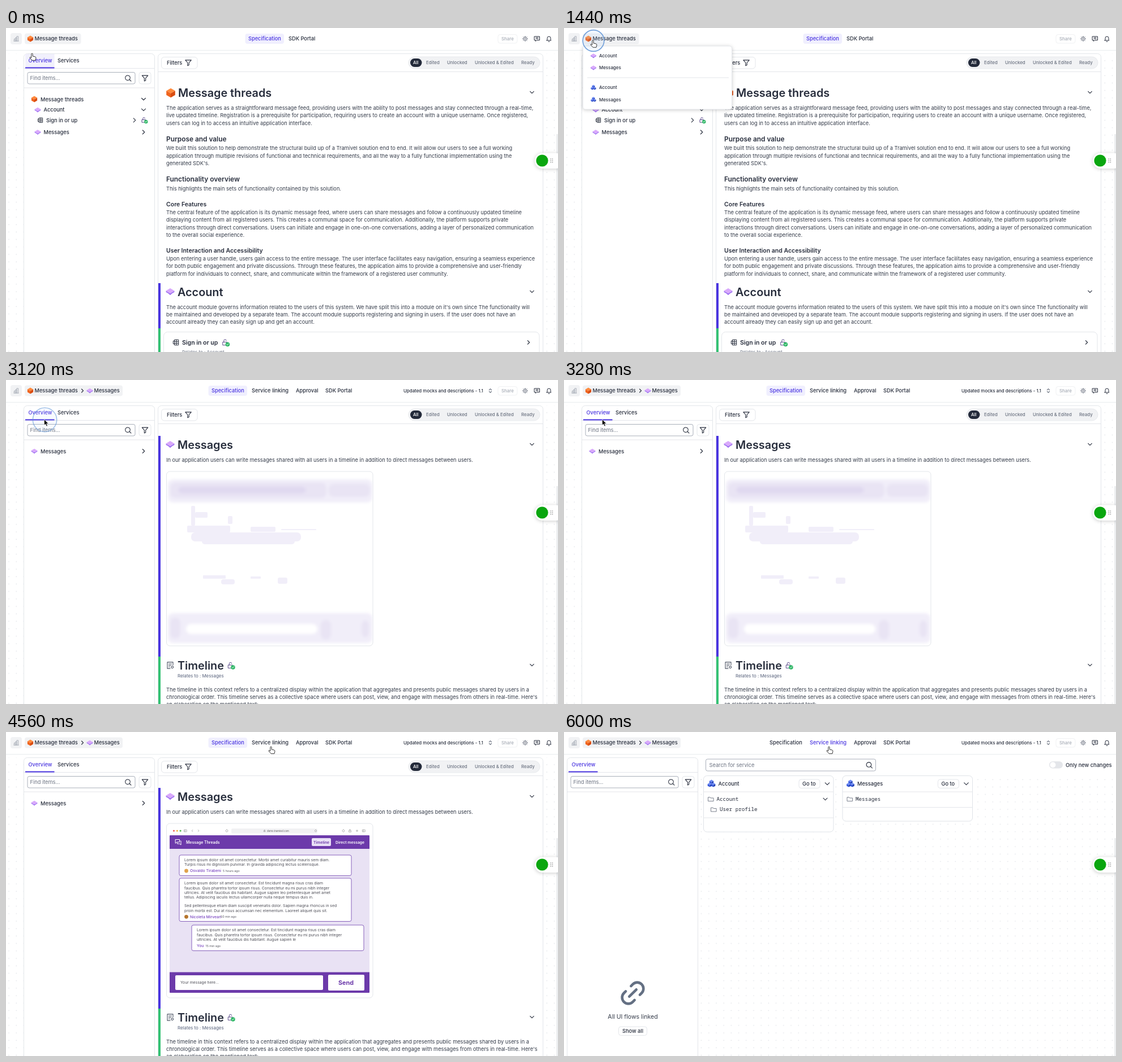
Animation, 975 px wide and 574 px high, one loop 6.48 s. Source, as an HTML page:

```html
<!DOCTYPE html>
<html lang="en">
<head>
<meta charset="utf-8">
<title>Message threads</title>
<style>
html, body { margin: 0; width: 100%; height: 100%; overflow: hidden; background: #fff; }
svg { display: block; font-family: Inter, sans-serif; font-optical-sizing: none; }
.mono { font-family: "Noto Sans Mono", monospace; }
.icon { fill: none; stroke-linecap: round; stroke-linejoin: round; vector-effect: non-scaling-stroke; }
.shadow { filter: drop-shadow(0 1px 3px #0003); }
</style>
</head>
<body>
<svg id="stage" width="975" height="574" viewBox="0 0 975 574"></svg>
<script>
const LOOP = 6480, OPEN_MENU = 1360, OPEN_MESSAGES = 2960, OPEN_LINKING = 5280;
const INK = '#272d3c', BODY = '#343b49', GREY = '#6b7280', LINE = '#e3e6ea';
const BLUE = '#4a35e0', GREEN = '#35c274', PURPLE = '#6c3aaa';

const ICONS = {
  search: 'M11 3a8 8 0 1 0 .01 0M17 17l5 5',
  funnel: 'M3 4h18l-7 8v7l-4 2v-9z',
  down: 'M6 9l6 6 6-6',
  right: 'M9 6l6 6-6 6',
  left: 'M15 6l-6 6 6 6',
  sort: 'M7 9l5-5 5 5M7 15l5 5 5-5',
  chart: 'M4 21v-8h5v8M9 21V8h5v13M14 21V3h6v18M3 21h18',
  gear: 'M12 9a3 3 0 1 0 .01 0M12 5a7 7 0 1 0 .01 0M12 2v3M12 19v3M2 12h3M19 12h3M5 5l2 2M17 17l2 2M5 19l2-2M17 7l2-2',
  chat: 'M3 4h18v13H11l-4 4v-4H3zM8 8h8M8 12h8',
  bell: 'M6 16v-6a6 6 0 0 1 12 0v6l2 2H4zM10 22h4',
  lock: 'M4 11h14v10H4zM7 11V7a4 4 0 0 1 8-1',
  flow: 'M8 3h13v18H8zM8 9h13M8 15h13M14 3v18M8 7H3v10h5',
  page: 'M20 11V3H4v18h8M8 8h8M8 12h6M8 16h3M18 14a3 3 0 1 0 .01 0',
  folder: 'M2 5h7l2 3h11v12H2z',
  talk: 'M3 3h14v9H8l-5 4zM20 8h2v14l-5-4H9v-3',
  plus: 'M12 5v14M5 12h14',
  panel: 'M3 5h18v14H3zM9 5v14',
  share: 'M6 10H4v11h16V10h-2M12 15V3M8 6l4-4 4 4',
  ring: 'M12 4a8 8 0 1 0 .01 0',
  chain: 'M9 17H7A5 5 0 0 1 7 7h2M15 7h2a5 5 0 0 1 0 10h-2M8 12h8'
};

// Text is placed by the middle of its capitals.
const text = (x, y, s, size = 9.24, weight = 400, color = BODY, extra = '') =>
  `<text x="${x}" y="${y + size * .364}" font-size="${size}" font-weight="${weight}" fill="${color}" ${extra}>${s}</text>`;
const label = (x, y, s, color = INK) => text(x, y, s, 9.24, 500, color);
const small = (x, y, s, color = INK) => text(x, y, s, 7.92, 500, color);
const heading = (x, y, s, size = 19.8) => text(x, y, s, size, 600, INK);
const lines = (x, y, rows, step = 13.2, size = 9.24, color = BODY) =>
  rows.map((s, i) => text(x, y + i * step, s, size, 400, color)).join('');
const rect = (x, y, x2, y2, fill = '#fff', stroke = 'none', r = 0, extra = '') =>
  `<rect x="${x}" y="${y}" width="${x2 - x}" height="${y2 - y}" rx="${r}" fill="${fill}" stroke="${stroke}" ${extra}/>`;
const rule = (x, x2, y, color = LINE) => rect(x, y, x2, y + 1, color);
const dot = (x, y, r, fill) => `<circle cx="${x}" cy="${y}" r="${r}" fill="${fill}"/>`;
const icon = (name, x, y, size = 14, color = INK, width = 1.1, turn = 0) =>
  `<path class="icon" d="${ICONS[name]}" stroke="${color}" stroke-width="${width}"
    transform="translate(${x} ${y}) rotate(${turn}) scale(${size / 24}) translate(-12 -12)"/>`;
const shape = (x, y, s, ...parts) =>
  `<g transform="translate(${x} ${y}) scale(${s})">${parts.map(([d, c]) => `<path d="${d}" fill="${c}"/>`).join('')}</g>`;
const cube = (x, y, s = 5.4, top = '#ff8a3d', left = '#f0641e', right = '#d94c10') => shape(x, y, s,
  ['M0-1L.95-.45L0 .1L-.95-.45z', top], ['M-.95-.45L0 .1V1L-.95 .45z', left], ['M.95-.45L0 .1V1L.95 .45z', right]);
const layers = (x, y, s = 5.4) => shape(x, y, s,
  ['M-1-.2V.15L-.5 .4L0 .85L.5 .4L1 .15V-.2L0 .4z', '#a273f2'], ['M0-.8L1-.2L0 .4L-1-.2z', '#d9a9fb']);
const service = (x, y, s = 3) => [[0, -.8], [-.8, .55], [.8, .55]]
  .map(([dx, dy]) => cube(x + dx * s, y + dy * s, s, '#6f8cf5', '#3457dc', '#2340b4')).join('');
const unlocked = (x, y, s = 11) => icon('lock', x, y, s, '#5b4a8a', 1) + dot(x + s * .3, y + s * .27, s * .29, '#2fb866') +
  `<path class="icon" d="M${x + s * .17} ${y + s * .27}l${s * .1} ${s * .1} ${s * .17}-${s * .2}" stroke="#fff" stroke-width=".9"/>`;

function header(page) {
  const tabs = page
    ? [[363, 'Specification'], [434, 'Service linking'], [512, 'Approval'], [564, 'SDK Portal']]
    : [[428, 'Specification'], [499, 'SDK Portal']];
  const active = page === 2 ? 1 : 0;
  return rule(0, 975, 39, '#e9ebee') + rect(8, 9, 28, 29, '#f1f2f4', 'none', 4) + icon('chart', 18, 19, 11, '#a3a9b3', .9) +
    rect(33, 9.5, page ? 206 : 132.5, 28.5, '#f1f2f4', 'none', 4) + cube(43, 19) + label(50.5, 19, 'Message threads') +
    (page ? icon('right', 135, 19, 12) + layers(148, 19) + label(155.5, 19, 'Messages') +
      small(702, 19, 'Updated mocks and descriptions - 1.1') + icon('sort', 855.5, 19, 10, GREY) : '') +
    (page < 2 ? rect(tabs[0][0] - 5.5, 10, tabs[0][0] + 63, 28, '#f0effe', 'none', 4) : '') +
    tabs.map(([x, s], i) => label(x, 19, s, i === active ? BLUE : INK)).join('') +
    rect(869, 11.5, 903, 27, '#fff', '#f0f1f3', 4) + small(875, 19, 'Share', '#a5abb5') +
    icon('gear', 917, 19, 11, GREY, .9) + icon('chat', 938, 19, 12, INK, 1) + icon('bell', 959, 19, 12, INK, 1);
}

function sidebar(x, tabs) {
  return rect(x + .5, 45.5, x + 231.5, 590, '#fff', LINE, 6) + rule(x, x + 231, 71) + rule(x, x + 231, 105.5) +
    (tabs > 1 ? rect(x + 3, 46, x + 54.5, 70, '#f1f0fc', 'none', 0, 'class="tabHover"') : '') +
    label(x + 8.5, 57.5, 'Overview', BLUE) + (tabs > 1 ? label(x + 60, 57.5, 'Services') : '') +
    rect(x + 3, 69.5, x + 54.5, 71.5, BLUE) +
    rect(x + 7, 78.5, x + 197, 99, '#fff', '#a9afba', 3) + text(x + 11.5, 89, 'Find items...', 9.24, 400, GREY) +
    icon('search', x + 184.5, 88.8, 13) + rect(x + 204, 78.5, x + 225, 99, '#fff', LINE, 4) + icon('funnel', x + 214.5, 88.8, 14);
}

function mainPanel() {
  return rect(268.5, 45.5, 948.5, 590, '#fff', LINE, 6) + rule(269, 948, 77) +
    rect(274.5, 51.5, 338, 72, '#fff', LINE, 5) + label(284, 61.5, 'Filters') + icon('funnel', 322, 61.5, 14) +
    rect(711, 51, 943, 72, '#f1f2f4', '#e8eaed', 10.5) + rect(714, 54, 734.5, 69, '#232a3a', 'none', 7.5) +
    small(719, 61.5, 'All', '#fff') +
    [[742, 'Edited'], [779, 'Unlocked'], [828, 'Unlocked &amp; Edited'], [910, 'Ready']]
      .map(([x, s]) => small(x, 61.5, s, GREY)).join('');
}

const dots = (x, y, x2) => rect(x, y, x2, 574, 'url(#dots)');
const shell = page => header(page) + dots(0, 45, 31) + dots(950, 45, 975) + sidebar(31, 2) + mainPanel();

const threadsPage = () => shell(0) +
  cube(50, 126) + label(61, 126.3, 'Message threads') + icon('down', 243, 126) +
  layers(56, 145) + label(66.5, 144.8, 'Account') + icon('down', 243, 144.8) +
  icon('flow', 60.5, 163.3, 11, INK, .9) + label(71, 163.3, 'Sign in or up') + icon('right', 227, 163.3) + unlocked(244, 163) +
  layers(56, 184.5) + label(66.5, 184.5, 'Messages') + icon('right', 243, 184.5) +
  cube(291, 115, 8.2) + heading(304, 115, 'Message threads') + icon('down', 929, 114, 13) +
  lines(283, 141.8, [
    'The application serves as a straightforward message feed, providing users with the ability to post messages and stay connected through a real-time,',
    'live updated timeline. Registration is a prerequisite for participation, requiring users to create an account with a unique username. Once registered,',
    'users can log in to access an intuitive application interface.']) +
  heading(283, 197, 'Purpose and value', 11.88) +
  lines(283, 213, [
    'We built this solution to help demonstrate the structural build up of a Tramivel solution end to end. It will allow our users to see a full working',
    'application through multiple revisions of functional and technical requirements, and all the way to a fully functional implementation using the',
    "generated SDK's."]) +
  heading(283, 268, 'Functionality overview', 11.88) +
  lines(283, 284.3, ['This highlights the main sets of functionality contained by this solution.']) +
  heading(283, 312.3, 'Core Features', 10.5) +
  lines(283, 326.8, [
    'The central feature of the application is its dynamic message feed, where users can share messages and follow a continuously updated timeline',
    'displaying content from all registered users. This creates a communal space for communication. Additionally, the platform supports private',
    'interactions through direct conversations. Users can initiate and engage in one-on-one conversations, adding a layer of personalized communication',
    'to the overall social experience.']) +
  heading(283, 394.3, 'User Interaction and Accessibility', 10.5) +
  lines(283, 408.8, [
    'Upon entering a user handle, users gain access to the entire message. The user interface facilitates easy navigation, ensuring a seamless experience',
    'for both public engagement and private discussions. Through these features, the application aims to provide a comprehensive and user-friendly',
    'platform for individuals to connect, share, and communicate within the framework of a registered user community.']) +
  rect(269, 452, 273, 532, BLUE) + rect(269, 532, 273, 574, GREEN) +
  layers(290, 467, 7.4) + heading(303, 467.5, 'Account') + icon('down', 929, 467, 13) +
  lines(283, 494.3, [
    "The account module governs information related to the users of this system. We have split this into a module on it's own since The functionality will",
    'be maintained and developed by a separate team. The account module supports registering and signing in users. If the user does not have an',
    'account already they can easily sign up and get an account.']) +
  rect(278.5, 538.5, 942, 600, '#fff', LINE, 7) + icon('flow', 300, 557, 12.5, INK, 1) +
  heading(311, 557.3, 'Sign in or up', 10.5) + unlocked(387.5, 557, 13) + icon('right', 923, 557, 13) +
  text(311, 574, 'Relates to : Account', 7.92, 400, GREY);

function mockup() {
  const bubble = (x, y, y2) => rect(x, y, x + 304, y2, '#fff', '#7b52b6', 3, 'stroke-width=".9"');
  const copy = (x, y, rows) => lines(x, y, rows, 8.25, 6.8, '#4d4d56');
  const author = (x, y, name, x2, ago) =>
    text(x, y, name, 6.8, 500, '#7a45c0') + text(x2, y, ago, 5.3, 400, '#55555f');
  const tool = (name, x, size = 6) => icon(name, x, 175, size, '#888', .6);
  return ['#f0605a', '#f2b53a', '#52b94e'].map((c, i) => dot(296.5 + i * 5.8, 175, 1.6, c)).join('') +
    tool('panel', 317) + tool('left', 329, 7) + tool('right', 340, 7) + tool('ring', 390) +
    rect(398, 171, 550, 179.5, '#f1f1f3', 'none', 2) + text(461, 175.2, 'demo.tramivel.com', 4.3, 400, '#555') + tool('lock', 457, 4) +
    tool('ring', 547, 5) + tool('ring', 596) + tool('share', 607.5) + tool('plus', 620) + tool('panel', 632) +
    rect(289, 183, 642, 462, PURPLE, 'none', 1) + rect(289, 207, 642, 425.5, '#e9e2f4') +
    icon('talk', 304, 195, 12, '#fff', 1) + text(318, 195.3, 'Message Threads', 6.9, 600, '#fff') +
    rect(540, 188, 574, 202, '#e9e0f6', 'none', 2) + text(543, 195.3, 'Timeline', 6.8, 600, PURPLE) +
    text(582, 195.3, 'Direct message', 6.8, 600, '#fff') +
    bubble(306, 218, 254.5) + copy(315, 226.5, [
      'Lorem ipsum dolor sit amet consectetur. Morbi amet curabitur mauris sem diam.',
      'Turpis risus mi dignissim pulvinar. In gravida adipiscing lectus scelerisque.']) +
    dot(318.5, 246, 3.4, '#e0a24c') + author(325, 246, 'Osvaldo Tirabeni', 383, '5 hours ago') +
    bubble(306, 259, 335.5) + copy(315, 268, [
      'Lorem ipsum dolor sit amet consectetur. Est tincidunt magna risus cras diam',
      'faucibus. Quis pharetra tortor ipsum risus. Consectetur eu mi purus nibh integer',
      'ultricies. At velit faucibus dis habitant. Augue sapien leo pellentesque amet amet',
      'tellus. Adipiscing iaculis lectus ullamcorper nulla neque tempus duis in.']) +
    copy(315, 308, [
      'Sed pellentesque etiam diam suscipit venenatis dolor. Sapien magna rhoncus in sed',
      'proin morbi est. Dui at risus accumsan nec elementum. Laoreet aliquet quis sit.']) +
    dot(318.5, 327.3, 3.4, '#b5752c') + author(325, 327.3, 'Nicoleta Mirvean', 379, '50 min ago') +
    bubble(328, 342, 387.5) + copy(337, 351, [
      'Lorem ipsum dolor sit amet consectetur. Est tincidunt magna risus cras diam',
      'faucibus. Quis pharetra tortor ipsum risus. Consectetur eu mi purus nibh integer',
      'ultricies. At velit faucibus dis habitant. Augue sapien le']) +
    author(337, 379, 'You', 352.5, '15 min ago') +
    rect(299, 431, 560, 457, '#fff', 'none', 2) + text(308, 444, 'Your message here...', 6.8, 400, '#4d4d56') +
    rect(569, 430, 633, 458, '#fff', 'none', 2) + text(587, 444.2, 'Send', 10.8, 700, PURPLE);
}

// Soft stand-in shown while the picture loads.
function preview() {
  const bar = (x, y, x2, y2, c) => rect(x, y, x2, y2, c, 'none', 9);
  const soft = '#f1eef9', mid = '#e9e4f4';
  return '<g style="filter:blur(2.5px)">' +
    bar(286, 176, 647, 217, soft) + bar(290, 182, 566, 209, mid) + bar(304, 189, 530, 201, '#e0d9f0') +
    bar(570, 184, 643, 207, mid) + bar(286, 413, 647, 466, soft) + bar(290, 421, 308, 458, mid) +
    bar(318, 432, 550, 450, '#fff') + bar(556, 425, 574, 460, mid) + bar(628, 426, 641, 456, mid) + '</g>' +
    [[327, 270, 521, 286, 7], [346, 280, 510, 291, 5], [320, 258, 396, 270, 2], [327, 223, 334, 258, 2], [334, 234, 356, 244, 2],
      [392, 241, 400, 255, 2], [432, 260, 476, 269, 2], [486, 264, 548, 266, 1], [348, 346, 388, 352, 1], [380, 353, 404, 362, 4],
      [432, 348, 450, 352, 1], [480, 350, 497, 361, 3]].map(([x, y, x2, y2, r]) => rect(x, y, x2, y2, soft, 'none', r)).join('');
}

const messagesPage = () => shell(1) +
  layers(50, 126) + label(61, 126.3, 'Messages') + icon('right', 243, 126) +
  rect(269, 99, 273, 490, BLUE) + rect(269, 490, 273, 574, GREEN) +
  layers(290, 114, 7.4) + heading(303, 115, 'Messages') + icon('down', 929, 114, 13) +
  lines(283, 141.8, ['In our application users can write messages shared with all users in a timeline in addition to direct messages between users.']) +
  rect(283.5, 162, 648, 471, '#fff', LINE, 6) + `<g id="preview">${preview()}</g><g id="mockup">${mockup()}</g>` +
  icon('page', 290, 505.5, 15, '#4b5363', 1.1) + heading(303, 506, 'Timeline') + unlocked(397, 505.5, 13) + icon('down', 929, 505, 13) +
  text(303, 524.5, 'Relates to : Messages', 7.92, 400, '#56607a') +
  lines(283, 548.3, [
    'The timeline in this context refers to a centralized display within the application that aggregates and presents public messages shared by users in a',
    "chronological order. This timeline serves as a collective space where users can post, view, and engage with messages from others in real-time. Here's",
    'an elaboration on the mentioned text:']);

function linkingPage() {
  const card = (x, bottom, split, name, folders) => rect(x + .5, 77.5, x + 230, bottom, '#fff', '#dfe3e8', 6) +
    rule(x, x + 230, 105.5) + rule(x, x + 230, split) + service(x + 14.5, 91.5, 3.9) + label(x + 26.5, 91.8, name) +
    rect(x + 169, 84, x + 206, 99.5, '#fff', LINE, 4) + label(x + 175, 91.8, 'Go to') + icon('down', x + 219, 91.8, 15) +
    folders.map((s, i) => icon('folder', x + 13.5 + i * 5, 118.8 + i * 18.5, 11, GREY, .9) +
      text(x + 23.5 + i * 5.5, 118.5 + i * 18.5, s, 9.24, 400, INK, 'class="mono"')).join('');
  return header(2) + dots(240, 76, 975) + sidebar(5, 1) +
    icon('chain', 121.5, 462.5, 53, '#647083', 4.6, -45) +
    text(121.5, 503.8, 'All UI flows linked', 10.56, 400, BODY, 'text-anchor="middle"') +
    rect(96.5, 522, 146.5, 537.5, '#fff', LINE, 4) + label(103, 530, 'Show all') +
    rect(250.5, 48, 550.5, 69, '#fff', '#a9afba', 3) + text(256.5, 58.8, 'Search for service', 9.24, 400, GREY) + icon('search', 539, 58.5, 13) +
    rect(857, 52, 881, 64.5, '#e4e6ea', 'none', 6.2) + dot(863.5, 58.2, 5, '#fff') + label(886, 58.5, 'Only new changes') +
    card(246, 177, 151.5, 'Account', ['Account', 'User profile']) + icon('down', 461.5, 118.8) +
    card(491.5, 158, 133, 'Messages', ['Messages']);
}

const menu = () => rect(33.5, 32, 296.5, 144, '#fff', '#e6e8ec', 4, 'class="shadow"') + rule(41, 291, 87.5) +
  [49.3, 70.5, 105.5, 126.7].map((y, i) => (i < 2 ? layers(52, y, 5) : service(52, y, 2.6)) +
    small(62, y, i % 2 ? 'Messages' : 'Account')).join('');

const widget = () => rect(972, 188, 975, 574, '#eceef0') + rect(934, 221.5, 985, 249, '#fff', 'none', 13.7, 'class="shadow"') +
  dot(947, 235, 10.6, '#0aa60f') +
  [0, 1, 2, 3, 4, 5].map(i => dot(962.3 + i % 2 * 3, 232 + (i >> 1) * 3, .75, '#777')).join('');

const $ = id => document.getElementById(id);
$('stage').innerHTML = `<defs><pattern id="dots" width="13.2" height="13.2" patternUnits="userSpaceOnUse">
    <circle cx="5" cy="5" r=".8" fill="#dde0e5"/></pattern></defs>` +
  [threadsPage, messagesPage, linkingPage].map((build, i) => `<g id="page${i}">${build()}</g>`).join('') +
  `<g id="menu">${menu()}</g>${widget()}
  <circle id="ring" fill="#9cc4f0" fill-opacity=".15" stroke="#5d93d6" stroke-width="1.6"/>
  <g id="cursor">
    <path id="hand" fill="#fff" stroke="#222" stroke-width=".9" stroke-linejoin="round"
      d="M-1.2 1.2a1.2 1.2 0 0 1 2.4 0V5l4 .8q2 .5 1.7 2.5l-.9 4H.2L-3.8 8q-.6-1.6 1-1.4L-1.2 8z"/>
    <path id="arrow" stroke="#fff" stroke-width=".6" d="M0 0V10l2.3-2.1 1.8 4 1.7-.7-1.7-4H7.3z"/>
  </g>`;

// Each move: start, end, target.
const MOVES = [[80, 1100, 51, 22], [1920, 2720, 67.5, 70], [3600, 4480, 468, 26]];
const CLICKS = [1280, 2880, 5200];
const show = (el, on) => el.style.display = on ? '' : 'none';
const ease = p => p < .5 ? 4 * p ** 3 : 1 - (2 - 2 * p) ** 3 / 2;

function cursorAt(t) {
  let x = 46, y = 45;
  for (const [start, end, toX, toY] of MOVES) {
    const p = ease(Math.min(1, Math.max(0, (t - start) / (end - start))));
    x += (toX - x) * p;
    y += (toY - y) * p;
  }
  return [x, y];
}

function draw() {
  const t = performance.now() % LOOP;
  const page = t < OPEN_MESSAGES ? 0 : t < OPEN_LINKING ? 1 : 2;
  for (let i = 0; i < 3; i++) show($('page' + i), i === page);
  show($('menu'), t >= OPEN_MENU && page === 0);
  show($('preview'), t < 3360);
  show($('mockup'), t >= 3360);
  $('mockup').style.filter = t < 3500 ? 'blur(.7px)' : 'none';

  const [x, y] = cursorAt(t);
  const pointing = page !== 1 || (x > 434 && y < 30);
  $('cursor').setAttribute('transform', `translate(${x} ${y})`);
  show($('hand'), pointing);
  show($('arrow'), !pointing);
  document.querySelectorAll('.tabHover').forEach(el => show(el, page === 0 && y > 43));

  const click = CLICKS.find(c => t >= c && t < c + 320);
  show($('ring'), click !== undefined);
  if (click !== undefined) {
    const p = (t - click) / 320;
    $('ring').setAttribute('cx', x + 1);
    $('ring').setAttribute('cy', y + .5);
    $('ring').setAttribute('r', 21.5 * (1 - (1 - p) ** 3));
    $('ring').style.opacity = 1 - p * p * p;
  }
  requestAnimationFrame(draw);
}
draw();
</script>
</body>
</html>
```
